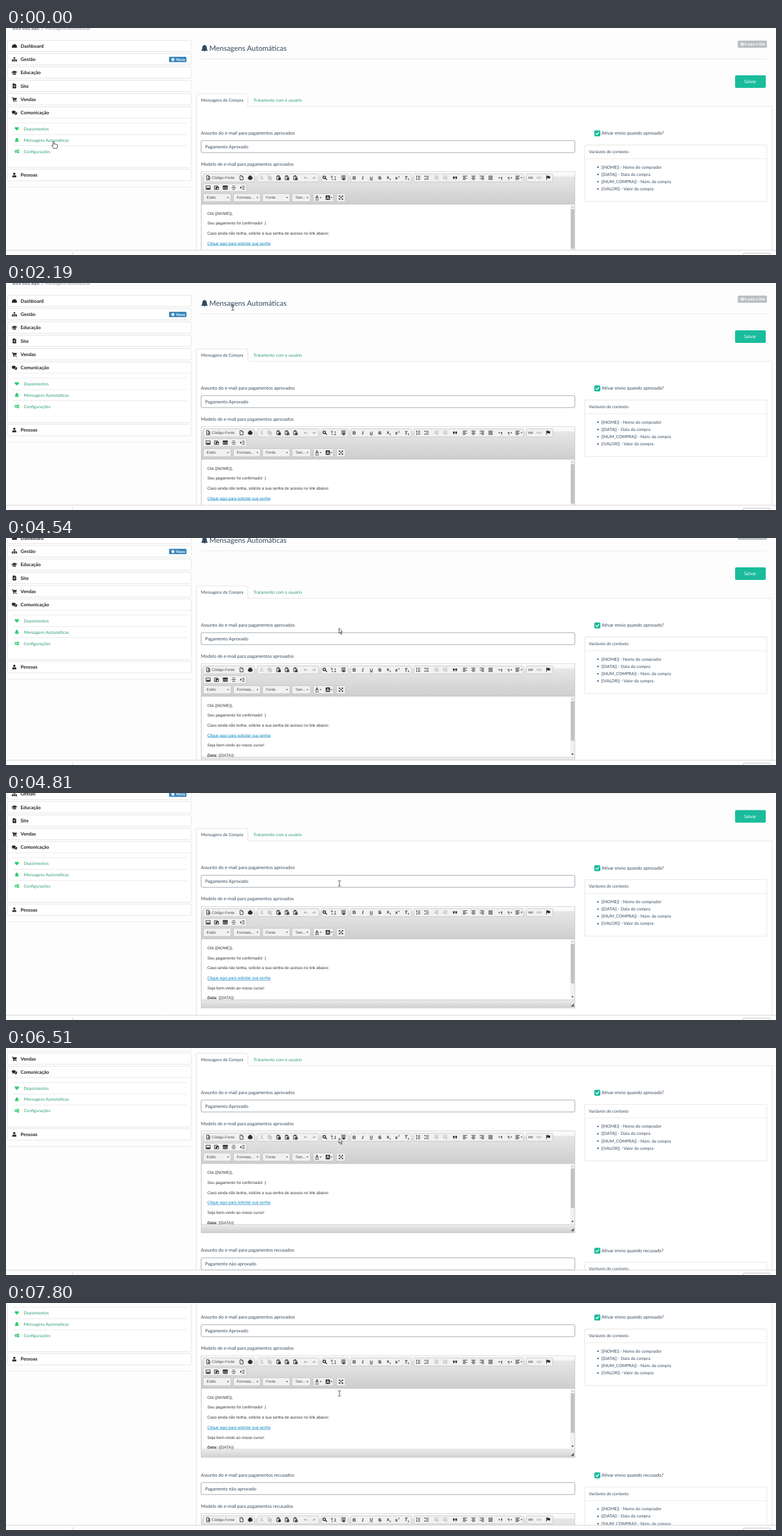
These frames come from a looping animation (1280 by 379 pixels, 8 s). An HTML page:

```html
<!DOCTYPE html>
<html lang="pt-BR">
<head>
<meta charset="utf-8">
<title>Mensagens Automáticas</title>
<style>
html, body { margin: 0; width: 100%; height: 100%; overflow: hidden; background: #fdfdfd; }
svg { display: block; width: 1280px; height: 379px; }
text { font: 7.05px Lato, sans-serif; fill: #34495e; text-rendering: geometricPrecision; white-space: pre; }
.label { font-size: 7.65px; }
.menu { font-size: 7.9px; font-weight: 700; fill: #222; }
.link { fill: #2c9c72; }
.h1 { font-size: 12.05px; }
.white { fill: #fff; }
.tag { font-size: 6.2px; font-weight: 700; fill: #fff; }
.ed { font: 6.62px "Liberation Sans", Arial, sans-serif; fill: #333; }
.ui { font: 6.25px "Liberation Sans", Arial, sans-serif; fill: #484848; }
.key { font: 700 8px "Liberation Sans", Arial, sans-serif; fill: #333; text-anchor: middle; }
.mini { font-size: 4.5px; }
.box { fill: #fff; stroke: #ddd; stroke-width: .8; }
.group { fill: #f1f1f1; stroke: #b9b9b9; stroke-width: .7; }
.rule { fill: none; stroke: #e4e4e4; stroke-width: .8; }
.line { fill: none; stroke: #383838; stroke-width: 1; }
.solid { fill: #2b2b2b; }
.dim { opacity: .3; }
.green { fill: #2ecc71; }

#page { animation: scroll 8s step-end infinite; }
@keyframes scroll {
  0% { transform: translateY(0); }
  56.75% { transform: translateY(-30px); }
  58.375% { transform: translateY(-50.6px); }
  78% { transform: translateY(-90.5px); }
  79.5% { transform: translateY(-101.2px); }
  93.875% { transform: translateY(-118.3px); }
  95.875% { transform: translateY(-146px); }
  97.5%, 100% { transform: translateY(-151.8px); }
}
#cursor { animation: move 8s step-end infinite; }
@keyframes move {
  0% { transform: translate(79px, 189px); }
  18.125% { transform: translate(150px, 184px); }
  19.75% { transform: translate(250px, 164px); }
  21.625% { transform: translate(338px, 94px); }
  23.625% { transform: translate(364px, 48px); }
  25.5% { transform: translate(371px, 42px); }
  27.375% { transform: translate(377px, 41px); }
  28.875% { transform: translate(443px, 46px); }
  30.625% { transform: translate(451px, 47px); }
  32.5% { transform: translate(453px, 47px); }
  34.375% { transform: translate(458px, 56px); }
  36.25% { transform: translate(463px, 68px); }
  37.875% { transform: translate(469px, 82px); }
  42.875% { transform: translate(520px, 122px); }
  44.5% { transform: translate(553.3px, 150px); }
  60.125% { transform: translate(554.3px, 151px); }
  81.375% { transform: translate(553.3px, 150px); }
  97.5%, 100% { transform: translate(554.3px, 151px); }
}
#cursor path { visibility: hidden; }
#cursor .hand { animation: hand 8s step-end infinite; }
#cursor .beam { animation: beam 8s step-end infinite; }
#cursor .arrow { animation: arrow 8s step-end infinite; }
@keyframes hand {
  0% { visibility: visible; }
  18.125%, 100% { visibility: hidden; }
}
@keyframes beam {
  0%, 28.875%, 81.375% { visibility: hidden; }
  27.375%, 60.125%, 97.5%, 100% { visibility: visible; }
}
@keyframes arrow {
  0%, 27.375%, 60.125%, 97.5%, 100% { visibility: hidden; }
  18.125%, 28.875%, 81.375% { visibility: visible; }
}
</style>
</head>
<body>
<svg viewBox="0 0 1280 379">
  <defs>
    <linearGradient id="bar" x1="0" y1="0" x2="0" y2="1">
      <stop offset="0" stop-color="#fcfcfc"/>
      <stop offset=".13" stop-color="#f7f7f7"/>
      <stop offset=".15" stop-color="#e6e6e6"/>
      <stop offset="1" stop-color="#cdcecd"/>
    </linearGradient>
    <linearGradient id="foot" x1="0" y1="0" x2="0" y2="1">
      <stop offset="0" stop-color="#ebebeb"/>
      <stop offset="1" stop-color="#cfd1cf"/>
    </linearGradient>
    <clipPath id="mail"><path d="M324 294H946V396H324z"/></clipPath>
  </defs>
  <g id="page"></g>
  <path d="M0 371H1280V379H0z" fill="#fdfdfd"/>
  <path d="M0 371H1280M111 374V379" class="line" style="stroke:#d3d3d3"/>
  <rect x="1225.5" y="376" width="45" height="8" rx="1.5" class="box" style="stroke:#aaa"/>
  <g id="cursor">
    <path class="hand" d="M-1 1Q0-1 1 1V5Q2 4 3 5Q4 4.500 5 5.500Q6.500 5 6.500 6.500V9L5.500 12H0L-2.600 8Q-3.500 6-1 7z" fill="#fff" stroke="#222" stroke-width=".8"/>
    <path class="beam" d="M-2.300-4.500Q0-4.500 0-3.500Q0-4.500 2.300-4.500M0-3.500V3.500M-2.300 4.500Q0 4.500 0 3.500Q0 4.500 2.300 4.500" fill="none" stroke="#333" stroke-width=".9"/>
    <path class="arrow" d="M.4.500V9L2.300 7.300 3.700 10.800 5 10.300 3.600 6.800H6z" fill="#fff" stroke="#222" stroke-width=".8"/>
  </g>
</svg>
<script>
const text = (x, y, s, cls = '') => `<text x="${x}" y="${y}" class="${cls}">${s}</text>`;
const rect = (x, y, x2, y2, cls, r = 1.5, more = '') =>
  `<rect x="${x}" y="${y}" width="${x2 - x}" height="${y2 - y}" rx="${r}" class="${cls}" ${more}/>`;
const icon = (x, y, d, cls = 'solid') => `<path transform="translate(${x} ${y})" class="${cls}" d="${d}"/>`;
const rule = d => `<path class="rule" d="${d}"/>`;
const key = (x, y, s, more = '') => `<text x="${x}" y="${y}" class="key" style="${more}">${s}</text>`;
const caret = (x, y) => icon(x, y, 'M-1.5-.8h3L0 1z');

// Four text rows; the short ones are aligned by k (0 left, .5 centre, 1 right)
const rows = (x, y, k, short = 4, cls = 'line') => icon(x, y,
  [7, short, 7, short].map((w, i) => `M${-3.5 + (7 - w) * k} ${i * 1.9 - 2.8}h${w}`).join(''), cls);

const art = {
  dash: 'M-4 3a4.300 4.300 0 1 1 8 0zM-.6 1.800L1-2 .9 2z',
  tree: 'M-1.300-3.600h2.600v2.300h-.9v1.100h3v1.300h.9v2.400h-2.500v-2.400h.8v-.5h-5.200v.5h.8v2.400h-2.500v-2.400h.9v-1.300h3v-1.100h-.9zM-1.200 1.100h2.400v2.400h-2.400z',
  cap: 'M-5-1L0-3.300 5-1 0 1.300zM-2.800 .8V2.800Q0 4 2.800 2.800V.8L0 2zM-4.400-1v3.500h.7V-1z',
  file: 'M-3-4h4l2 2v6h-6zM-1.600-1v.7h3.200v-.7zm0 1.700v.7h3.200v-.7z',
  cart: 'M-4.200-3.300h1.800l.3 1h6.100L3.300 1-1.300 1.400v.5h4.500v.9h-5.500l.1-1.500-1-3.700h-1zM-1.700 2.900h1.500v1.300h-1.500zM2 2.900h1.500v1.300H2z',
  talk: 'M-4.500-.5a3.300 2.500 0 1 1 3.400 2.300l-2.600 1 .6-1.400zM2.800-1.500q3.400 2 .8 4.200l.6 1.300-2.300-.7q-2 .2-3-.8 4.300-.3 3.900-4z',
  user: 'M-1.900-2a1.900 1.900 0 1 1 3.800 0 1.900 1.900 0 1 1-3.800 0M-3.500 3.800Q-3.500.5-1.500.4 0 1.300 1.500.4 3.500.5 3.500 3.800z',
  heart: 'M0 3L-3.300-.2Q-3.800-3-1.700-3-.4-3 0-1.900.4-3 1.700-3 3.800-3 3.300-.2z',
  bell: 'M-.5-3.700h1Q2.500-3 2.500 0q0 1.500 1.200 2.400H-3.700Q-2.500 1.500-2.500 0-2.500-3-.5-3.700M-1 2.800H1Q0 4.200-1 2.800z',
  star: 'M0-3.500L1-1.200 3.500-1 1.600.7 2.200 3.200 0 1.900-2.200 3.200-1.600.7-3.500-1-1-1.200z',
  page: 'M-2.500-3.500h3.200l2 2v5h-5.200zM.7-3.500v2h2',
  paste: 'M-3-2.700h5v6h-5zM-1.500-3.600h2v1.500h-2zM0 0h3.300v3.500H0z',
  back: 'M-3 0L-.5-2.200V-.8Q3-1 3 2.300 2 .5-.5.7V2.200z',
};

function sidebar() {
  const items = [['Dashboard', 'dash'], ['Gestão', 'tree'], ['Educação', 'cap'], ['Site', 'file'], ['Vendas', 'cart'], ['Comunicação', 'talk']];
  let s = items.map(([name, pic], i) => {
    const y = 30 + i * 22.26;
    return rect(2.5, y - 9.5, 308, i == 5 ? 233 : y + 9.300, 'box') + icon(14, y, art[pic]) + text(24.300, y + 2.800, name, 'menu');
  }).join('');
  s += rule('M3 150.500H308M11 158.700H301M11 178H301M11 196.500H301M2 265.700H308');
  s += icon(18, 168.300, art.heart, 'green') + icon(18, 187.300, art.bell, 'green');
  s += '<g fill="none" stroke="#2ecc71" stroke-width="1.500"><circle cx="16.700" cy="206" r="1.700"/><circle cx="20.300" cy="204.200" r=".8"/><circle cx="20.300" cy="207.700" r=".8"/></g>';
  ['Depoimentos', 'Mensagens Automáticas', 'Configurações'].forEach((name, i) => s += text(29.500, 170.900 + i * 18.800, name, 'link'));
  s += rect(2.5, 236, 308, 255, 'box') + icon(13.800, 245.400, art.user) + text(24.300, 248.300, 'Pessoas', 'menu');
  s += rect(271, 48, 300, 57, '', 1.5, 'fill="#3a87bd"') + icon(277.500, 52.500, art.star, 'white') + text(283, 54.700, 'Novo', 'tag');
  return s;
}

function header() {
  return text(10, 2.800, 'Você está aqui:') + text(59, 2.800, '/') + `<g opacity=".6">${text(65, 2.800, 'Mensagens Automáticas')}</g>`
    + `<g transform="translate(330 34.200) scale(1.550)"><path d="${art.bell}" fill="#34495e"/></g>`
    + text(338, 38.300, 'Mensagens Automáticas', 'h1')
    + rule('M324 51.500H1265')
    + rect(1216.500, 21, 1265, 33, '', 1.5, 'fill="#bac0c1"')
    + '<circle cx="1224" cy="27" r="2.700" fill="#fff"/><path d="M1221.500 27h5M1224 24.500v5" stroke="#bac0c1" stroke-width=".6"/>'
    + text(1227.500, 29.200, 'Ir para o Site', 'tag')
    + rect(1212, 79, 1263, 100, '', 2, 'fill="#1abc9c"') + text(1227, 92.200, 'Salvar', 'label white')
    + '<path class="box" d="M316.500 800V112Q316.500 110 318.500 110H400Q402 110 402 112V130.700H1273V800z"/>'
    + text(324, 122.900, 'Mensagens de Compra') + text(411.500, 122.900, 'Tratamento com o usuário', 'link');
}

function toolbar() {
  let s = '';
  const y = 250, y2 = 266.600, y3 = 283.200;
  for (const [a, b] of [[328, 413], [418, 520], [524, 569], [573, 674], [678, 860], [865, 909]]) s += rect(a, 243.500, b, 257, 'group');
  s += rect(328, 260, 400, 273, 'group') + rect(511, 276.500, 544, 290, 'group') + rect(549.500, 276.500, 564, 290, 'group');

  s += icon(336, y, art.page, 'line') + icon(337, 251, 'M-2 0h4M0-1.500v3', 'line') + text(342, 252.200, 'Código-Fonte', 'ui');
  s += icon(391.500, y, art.page, 'line') + icon(406, y, 'M-2.200-3.500h4.400v2h1.500v4h-1.500v1h-4.400v-1h-1.500v-4h1.500z');
  s += icon(406, y, 'M-1.500 1h3M-1.500-2.500h3', 'line white');
  s += icon(425, y, 'M-2-3.500L2 2.500M2-3.500L-2 2.500M-3 2.500h1.500M1.500 2.500H3', 'line dim');
  s += icon(438.500, y, 'M-3-3h3.500v4.500H-3zM-.7-1H3v4.500H-.7z', 'line dim');
  for (const x of [453, 467, 481]) s += icon(x, y, art.paste, 'line');
  s += icon(453, y, 'M0 0h3v3H0z') + icon(467, y, 'M0 1h3M1.500 1v2', 'line') + icon(481, y, 'M0 1l1 2 1-2 1 2', 'line');
  s += icon(498, y, art.back, 'solid dim') + `<g transform="translate(1010 0) scale(-1 1)">${icon(498, y, art.back, 'solid dim')}</g>`;
  s += icon(530, y, 'M-3-.7a2.100 2.100 0 1 1 4.200 0 2.100 2.100 0 1 1-4.200 0M.8.800L3.500 3.500', 'line" stroke-width="2" style="stroke-width:1.600');
  s += key(541.800, 250, 'b', 'font-size:5px') + key(547.200, 253.500, 'a', 'font-size:5px') + icon(544, 251, 'M2-2.500h1.700v1.500M-2 .5v1.500h1.500', 'line');
  s += rows(561, 249.500, 0, 7) + icon(561, y, 'M-1 1.500h3v2.500h-3z');

  s += key(579, 252.900, 'B') + key(593, 252.900, 'I', 'font-style:italic;font-family:Liberation Serif,serif');
  s += key(607.300, 252.500, 'U', 'font-size:7px;text-decoration:underline') + key(621.500, 252.900, 'S', 'text-decoration:line-through');
  s += key(635, 252, 'x') + key(638.700, 254, '2', 'font-size:4px') + key(649, 253, 'x') + key(653, 249.500, '2', 'font-size:4px');
  s += key(665, 252.500, 'T', 'font-style:italic') + key(669, 254, 'x', 'font-size:5px');

  s += [685, 699].map((x, i) => icon(x, y, 'M-.5-2.500h4M-.5 0h4M-.5 2.500h4', 'line') + icon(x, y, i ? 'M-3.300-3.300h1.700v1.700h-1.700zM-3.300 1.500h1.700v1.700h-1.700z' : 'M-3-3.500h1v3h-1zM-3 .800h1v3h-1z')).join('');
  s += [715.500, 730].map((x, i) => rows(x, y, 1, 4, 'line dim') + icon(x, y, i ? 'M-3.500-1.500l2 1.500-2 1.500z' : 'M-1.500-1.500l-2 1.500 2 1.500z', 'solid dim')).join('');
  s += icon(746.500, y, 'M-3.500-2h2.800v2.700l-1.500 2h-1l.8-2h-1.100zM.4-2h2.800v2.700l-1.500 2h-1l.8-2H.4z');
  s += rows(763, y, 0) + rows(777, y, .5) + rows(791, y, 1) + rows(805.500, y, 0, 7);
  s += key(824, 252.500, '¶', 'font-size:6px') + icon(820, y, 'M-1-1.500L1 0-1 1.500z') + key(835.500, 252.500, '¶', 'font-size:6px') + icon(839.500, y, 'M1-1.500L-1 0 1 1.500z');
  s += rows(850.500, y, 0, 5) + caret(857, y);
  s += [872, 886].map((x, i) => icon(x, y, 'M-.5-1.200h-2q-1 0-1 1.200t1 1.200h2M.5-1.200h2q1 0 1 1.200t-1 1.200h-2M-1.500 0h3', i ? 'line dim' : 'line" opacity=".7')).join('');
  s += icon(901, y, 'M-3-3.500h.9v7H-3zM-1.800-3.200Q0-4 1 -3T3.500-3V1Q2 1.700.8 1T-1.800 1z');

  s += icon(336, y2, 'M-3.500-3h7v6h-7z', 'line') + icon(336, y2, 'M-3 2.500l2-3 1.500 1.500L2-.5 3 2.500z');
  s += icon(350, y2, 'M-3.500-3h5v1.500h2v4.500h-7z', 'line') + icon(350.500, y2, 'M-2-1.500h4V.5H0v2h-2z');
  s += icon(364.500, y2, 'M-3.500-3h7v6h-7zM-3.500-.700h7M-3.500 1.200h7M-1.200-3v6M1.200-3v6', 'line') + icon(364.500, y2, 'M-4-3.500h8v2h-8z');
  s += icon(378.500, y2, 'M-2-2.800h4M-3.500 0h7M-2 2.800h4', 'line') + icon(393, y2, 'M-.5-2.500h4M.500 0h3M-.5 2.500h4', 'line') + icon(393, y2, 'M-3.500-2L-.8 0-3.500 2z');

  for (const [a, b, name] of [[328, 374, 'Estilo'], [378, 423, 'Formata...'], [426.500, 472, 'Fonte'], [475.500, 506, 'Tam...']])
    s += rect(a, 276.500, b, 290, 'group') + text(a + 5.500, 285.300, name, 'ui') + caret(b - 5, y3);
  s += key(517, 285.300, 'A') + icon(517, 287, 'M-3 0h6', 'line') + caret(523, y3);
  s += rect(531.500, 279.500, 538.500, 287, 'solid', 0) + key(535, 285.700, 'A', 'fill:#fff;font-size:7px') + caret(541, y3);
  s += icon(556.800, y3, 'M-3 3L3-3M-3-3L3 3', 'line') + icon(556.800, y3, 'M-3.500-3.500h2.800l-2.800 2.800zM3.500-3.500v2.800L.7-3.500zM-3.500 3.500V.7l2.800 2.800zM3.500 3.500H.7L3.500.7z');
  return s;
}

function block(dy, kind, subject) {
  const mail = ['Olá {{NOME}},', 'Seu pagamento foi confirmado! :)', 'Caso ainda não tenha, solicite a sua senha de acesso no link abaixo:',
    '<tspan fill="#0782c1" text-decoration="underline">Clique aqui para solicitar sua senha</tspan>', 'Seja bem-vindo ao nosso curso!',
    '<tspan font-weight="700" font-style="italic">Data:</tspan> {{DATA}}'];
  const vars = ['{{NOME}} - Nome do comprador', '{{DATA}} - Data da compra', '{{NUM_COMPRA}} - Núm. da compra', '{{VALOR}} - Valor da compra'];
  return `<g transform="translate(0 ${dy})">`
    + text(324, 178, `Assunto do e-mail para pagamentos ${kind}s`, 'label')
    + rect(324.300, 188, 945.700, 208, 'box', 2, 'style="stroke:#8792a0"') + text(331, 200.900, subject, 'label')
    + text(324, 230, `Modelo de e-mail para pagamentos ${kind}s`, 'label')
    + rect(324.400, 240, 945.700, 409.500, 'box', 0, 'style="stroke:#b6b6b6"')
    + rect(324.800, 240.300, 945.300, 294, '', 0, 'fill="url(#bar)"')
    + '<path d="M324.500 294.200H946M324.500 396H946" stroke="#b6b6b6" stroke-width=".8"/>' + toolbar()
    + `<g clip-path="url(#mail)">${mail.map((s, i) => text(334.800, 311.600 + i * 16.680, s, 'ed')).join('')}</g>`
    + rect(938, 294.700, 945.300, 395.700, '', 0, 'fill="#f1f1f1"') + rect(939, 302.500, 944.800, 368.500, '', 0, 'fill="#c1c1c1"')
    + icon(941.800, 298.700, 'M-2 1h4L0-1.200z', 'solid dim') + icon(941.800, 391, 'M-2-1h4L0 1.200z')
    + rect(324.800, 396.400, 945.300, 409.200, '', 0, 'fill="url(#foot)"') + icon(941.500, 404.500, 'M2.500-2.500v5h-5z', 'solid" opacity=".75')
    + rect(978, 171, 988, 181, '', 2, 'fill="#1abc9c"') + icon(983, 176, 'M-2.700 0L-.7 2 2.800-2', 'line" style="stroke:#fff;stroke-width:1.300')
    + text(990, 178.300, `Ativar envio quando ${kind}?`, 'label')
    + rect(962, 195.300, 1264.700, 289.700, 'box') + rule('M962 218.200H1264.500') + text(969, 208.900, 'Variáveis de contexto')
    + vars.map((s, i) => `<circle cx="984" cy="${232.300 + i * 12.150}" r="1.200" fill="#34495e"/>` + text(989.500, 234.500 + i * 12.150, s)).join('')
    + '</g>';
}

document.getElementById('page').innerHTML = sidebar() + header()
  + block(0, 'aprovado', 'Pagamento Aprovado') + block(263.600, 'recusado', 'Pagamento não aprovado');
</script>
</body>
</html>
```
